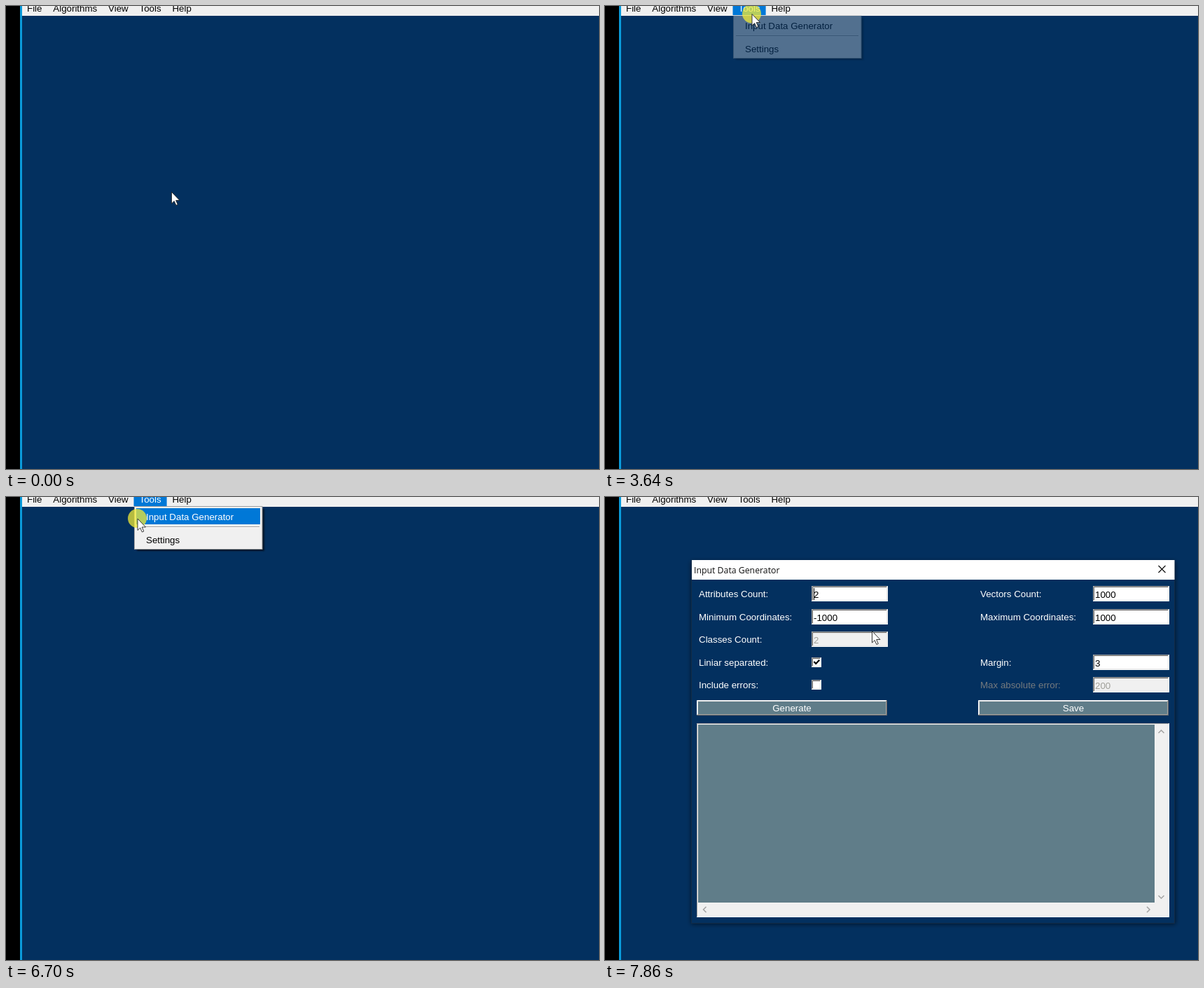
An HTML page that plays this animation: 847x661 px, repeating every 8000 ms.

```html
<!DOCTYPE html>
<html lang="en">
<head>
<meta charset="utf-8">
<title>Input Data Generator</title>
<style>
  html, body { margin: 0; width: 100%; height: 100%; overflow: hidden; background: #000; }
  svg { display: block; width: 847px; height: 661px; }
  text { font: 13.33px "Liberation Sans", Arial, sans-serif; white-space: pre; }
  .title { font: 12.3px "Open Sans", "Noto Sans", sans-serif; }
</style>
</head>
<body>
<svg viewBox="0 0 847 661" xmlns="http://www.w3.org/2000/svg">
  <defs>
    <filter id="soft" x="-5%" y="-5%" width="110%" height="110%"><feGaussianBlur stdDeviation="3"/></filter>
    <filter id="tight" x="-5%" y="-10%" width="110%" height="120%"><feGaussianBlur stdDeviation="1"/></filter>
  </defs>
  <rect x="20" width="3" height="661" fill="#0a9bdb"/>
  <rect x="23" width="824" height="661" fill="#03305f"/>
  <rect x="23" width="824" height="14" fill="#f0f0f0"/>
  <g id="bar"></g>
  <g id="tools"></g>
  <g id="menu"></g>
  <g id="item"></g>
  <g id="dialog"></g>
  <circle id="click" r="13.5" fill="#f2ea35" fill-opacity=".75"/>
  <path id="cursor" d="M.5 .5V17L4.2 13.5L6.9 19.5L9.3 18.5L6.7 12.5H12Z" fill="#fff" stroke="#222" stroke-width=".9"/>
</svg>
<script>
const LOOP = 8000;
const OPEN = 3570, HOVER = 4370, PICK = 6870, SHOW = 6940;
const NAVY = '#03305f', FACE = '#f0f0f0', SELECT = '#0078d7', SLATE = '#607d89';
const CAPTION = 'Input Data Generator';
const $ = id => document.getElementById(id);

const rect = (x, y, w, h, fill, extra = '') =>
  `<rect x="${x}" y="${y}" width="${w}" height="${h}" fill="${fill}" ${extra}/>`;
const text = (x, y, s, fill = '#000', extra = '') =>
  `<text x="${x}" y="${y}" fill="${fill}" ${extra}>${s}</text>`;
const line = (d, color, width = 1) =>
  `<path d="${d}" fill="none" stroke="${color}" stroke-width="${width}"/>`;

// One-pixel frame: top/left colour, then bottom/right colour.
const edge = (x, y, w, h, light, dark) =>
  line(`M${x + .5} ${y + h}V${y + .5}H${x + w}`, light) +
  line(`M${x + w - .5} ${y}V${y + h - .5}H${x}`, dark);

const sunken = (x, y, w, h, fill) =>
  rect(x, y, w, h, fill) + edge(x, y, w, h, '#a0a0a0', '#fff') +
  edge(x + 1, y + 1, w - 2, h - 2, '#696969', '#e3e3e3');

function entry(x, y, value, enabled) {
  return sunken(x, y, 109, 22, enabled ? '#fff' : FACE) +
    text(x + 3, y + 17, value, enabled ? '#000' : '#a0a09a');
}

const checkbox = (x, y, on) =>
  sunken(x, y, 14, 14, '#fff') +
  (on ? line(`M${x + 3.5} ${y + 6}l2.7 3 5-5.3`, '#000', 2.2) : '');

const button = (x, caption) =>
  rect(x, 290, 272, 22, SLATE) + edge(x, 290, 272, 22, '#fff', '#696969') +
  edge(x + 1, 291, 270, 20, '#e3e3e3', '#a0a0a0') +
  text(x + 136, 305.5, caption, '#fff', 'text-anchor="middle"');

// Each heading follows the measured width of the one before it.
function buildBar() {
  let x = 30;
  for (const name of ['File', 'Algorithms', 'View', 'Tools', 'Help']) {
    $('bar').insertAdjacentHTML('beforeend', text(x, 8, name));
    const width = $('bar').lastElementChild.getComputedTextLength();
    if (name === 'Tools')
      $('tools').innerHTML = rect(x - 8, 0, width + 16, 13, SELECT) + text(x, 8, name, '#fff');
    x += width + 15.8;
  }
}

function buildMenu() {
  $('menu').innerHTML =
    rect(187, 17, 182, 60, '#000', 'fill-opacity=".6" filter="url(#tight)"') +
    rect(183.5, 13.5, 182.5, 61, FACE, 'stroke="#a0a0a0"') +
    text(200, 33, CAPTION) +
    line('M187 42.5H362', '#a0a0a0') + line('M187 43.5H362', '#fff') +
    text(200, 65.5, 'Settings');
  $('item').innerHTML = rect(186, 16, 177, 23, SELECT) + text(200, 33, CAPTION, '#fff');
}

// A column of labelled fields; true or false makes a checkbox, "~" marks a disabled value.
function column(x, gap, fields) {
  return fields.map(([name, value], n) => {
    const y = Math.round(127 + 32.6 * n), box = x + gap;
    const disabled = value?.[0] === '~';
    const field = typeof value === 'boolean' ? checkbox(box, y + 4, value)
      : value ? entry(box, y, value.replace('~', ''), !disabled) : '';
    return text(x, y + 16, name, disabled && n === 4 ? '#757a7e' : '#fff') + field;
  }).join('');
}

function buildDialog() {
  $('dialog').innerHTML =
    rect(123, 92, 692, 518, '#000', 'fill-opacity=".55" filter="url(#soft)"') +
    rect(123.5, 90.5, 690, 518, NAVY, 'stroke="#132c47"') +
    rect(124, 90, 689.5, 28, '#fff') +
    text(127, 108.5, CAPTION, '#111', 'class="title"') +
    line('M790.5 98L800.5 108M800.5 98L790.5 108', '#111', 1.2) +
    column(134, 161, [['Attributes Count:', '2'], ['Minimum Coordinates:', '-1000'],
      ['Classes Count:', '~2'], ['Liniar separated:', true], ['Include errors:', false]]) +
    column(536, 161, [['Vectors Count:', '1000'], ['Maximum Coordinates:', '1000'],
      [''], ['Margin:', '3'], ['Max absolute error:', '~200']]) +
    line('M298.5 130V147', '#000') +
    button(131, 'Generate') + button(533, 'Save') +
    rect(131, 323, 675, 277, FACE) + rect(133, 325, 652, 254, SLATE) +
    edge(131, 323, 675, 277, '#a0a0a0', '#fff') +
    line('M790.5 337l4-4 4 4M790.5 569l4 4 4-4M144.5 585l-4 4 4 4M774 585l4 4-4 4', '#a3a3a3', 1.5);
}

function stepped(t, start, end) {
  if (t < start) return 0;
  const count = Math.round((end - start) / 85) + 1;
  if (count === 1) return 1;
  return Math.min(1, (Math.floor((t - start) * (count - 1) / (end - start) + 1e-6) + 1) / count);
}

const linear = p => p, easeIn = p => p * p, easeOut = p => 1 - (1 - p) ** 2;
const leg = (start, end, x, y, ease = linear) => ({ start, end, x, y, ease });
const path = [
  leg(300, 472, 120, 99, easeIn), leg(558, 730, 146, 44, easeOut),
  leg(960, 1050, 151, 44), leg(1440, 1530, 154, 59),
  leg(2310, 3100, 196, 15), leg(3180, 3420, 209.5, 11),
  leg(HOVER, 4600, 205, 21), leg(5300, 5530, 194, 31), leg(6310, 6380, 187.5, 30.5),
  leg(SHOW, SHOW, 358, 191), leg(7010, 7400, 383, 204), leg(7780, 7860, 381, 191)
];

function pointer(t) {
  let x = 236, y = 265;
  for (const { start, end, x: toX, y: toY, ease } of path) {
    const p = ease(stepped(t, start, end));
    x += (toX - x) * p;
    y += (toY - y) * p;
  }
  return `translate(${x} ${y})`;
}

function draw(t) {
  const within = (start, end) => t >= start && t < end ? 1 : 0;
  const opacity = {
    tools: within(OPEN, PICK),
    menu: within(OPEN, PICK) * stepped(t, 3640, 3810),
    item: within(HOVER, PICK) + within(PICK, SHOW) * .56,
    dialog: within(SHOW, LOOP),
    click: within(OPEN, 3730) + within(6700, PICK)
  };
  for (const id in opacity) $(id).setAttribute('opacity', opacity[id]);
  for (const id of ['cursor', 'click']) $(id).setAttribute('transform', pointer(t));
}

buildBar();
buildMenu();
buildDialog();
const begin = performance.now();
function tick() {
  draw((performance.now() - begin) % LOOP);
  requestAnimationFrame(tick);
}
tick();
</script>
</body>
</html>
```
